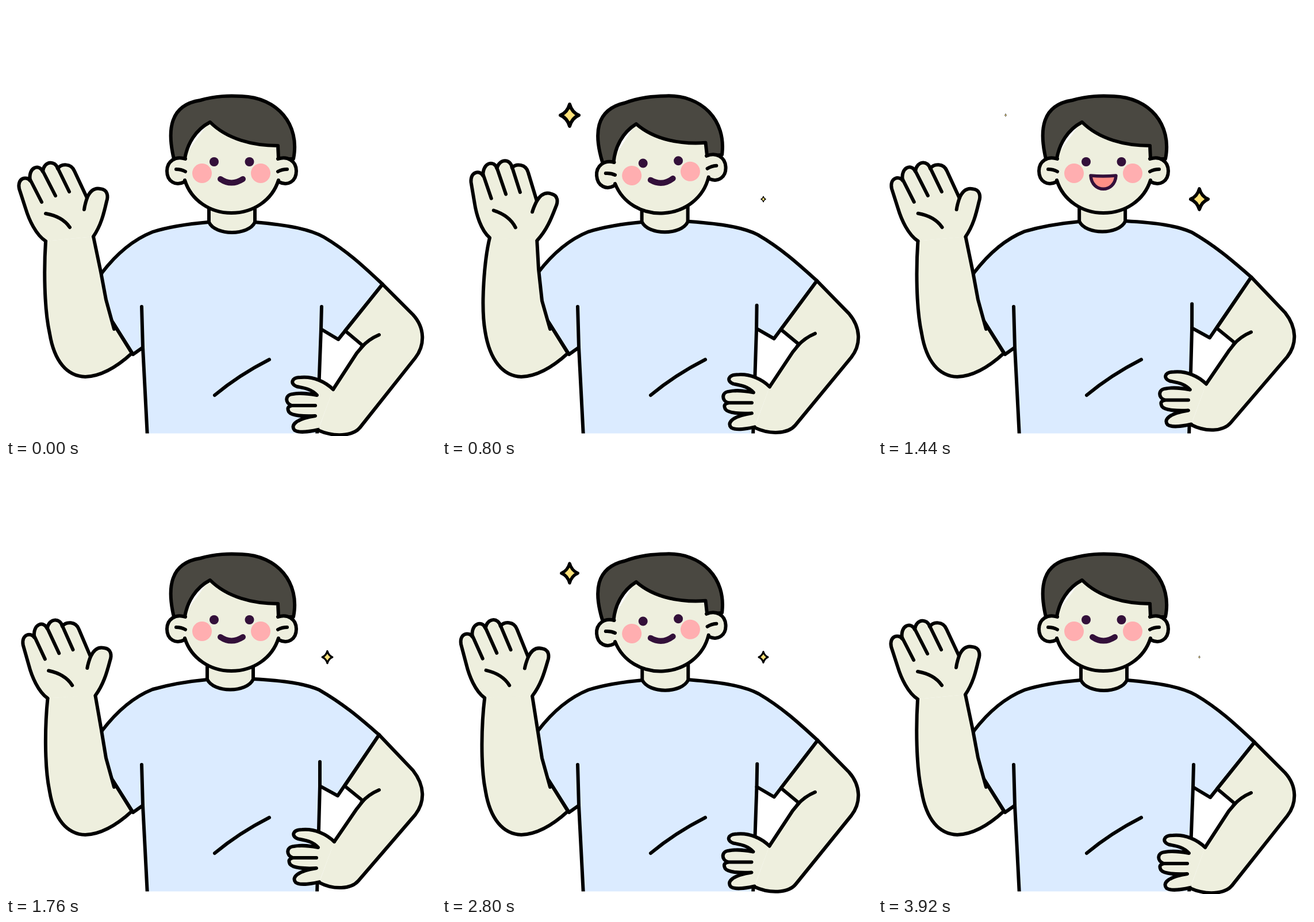
Recreate the animation shown at these times as an HTML page. Size 748 by 748 pixels, loop 4000 ms.

```html
<!DOCTYPE html>
<html>
<head>
<meta charset="utf-8">
<style>
  html, body { margin: 0; width: 100%; height: 100%; overflow: hidden; background: #fff; }
  svg { display: block; width: 100%; height: 100%; }
  .ink { stroke: #000; stroke-width: 6; stroke-linecap: round; stroke-linejoin: round; }
  .skin { fill: #eeefde; }
  .line { fill: none; }
  .hair { fill: #4a4841; }
  .shirt { fill: #dbebff; }
  .blush { fill: #ffaeb0; }
  .plum { fill: #33103a; }
  .spark { fill: #ffe27a; }
</style>
</head>
<body>
<svg viewBox="0 0 748 748">
  <defs>
    <path id="star" d="M0-19Q4-5 16 0Q4 5 0 19Q-4 5-16 0Q-4-5 0-19Z"/>
  </defs>
  <g class="ink">
    <path id="shirt" class="shirt"/>
    <path id="seams" class="line"/>
    <path class="line" d="M363 677Q405 642 458 615"/>
    <rect x="200" y="743.5" width="350" height="10" fill="#fff" stroke="none"/>

    <path id="restArm" class="skin"/>
    <path id="crease" class="line"/>
    <g id="restHand">
      <path class="skin" d="M543 737C525 741 510 743 502 738C494 729 505 718 538 713C520 714 497 713 492 706C489 700 490 697 497 695C485 691 485 676 499 675C515 672 530 675 541 677C530 665 515 664 506 662C493 657 497 646 513 646C535 644 556 654 569 667"/>
      <path class="line" d="M496 695L538 695"/>
    </g>

    <path id="waveArm" class="skin"/>
    <g id="waveHand">
      <path class="skin" d="M69 409C52 398 40 372 34 352L23 318C19 299 36 295 42 304C38 280 58 274 64 288C66 269 86 268 90 283C96 274 113 273 119 287L141 334C146 322 154 316 164 318C177 319 178 331 175 340C170 362 165 382 152 401"/>
      <path class="line" d="M41 300L62 341M64 287L86 330M90 282L110 323M136 354C137 346 139 340 141 334M69 361Q98 366 111 385"/>
    </g>

    <path id="neck" class="skin" d="M353 340V376C364 400 422 400 433 376V340"/>
    <g id="head">
      <path class="skin" stroke="none" d="M311 303C322 338 355 360 392 360C430 360 463 338 474 303V240L355 200L311 260Z"/>
      <path class="hair" d="M292 266C280 215 285 172 338 164C365 156 388 156 410 157C472 159 512 206 500 266L474 266L473 243C430 243 385 232 355 202C330 215 315 240 311 266Z"/>
      <path class="skin" d="M312 266C295 260 280 270 280 287C280 305 295 314 310 306"/>
      <path class="skin" d="M473 266C490 260 505 270 505 287C505 305 490 314 475 306"/>
      <path class="line" d="M311 303C322 338 355 360 392 360C430 360 463 338 474 303M296 284Q305 284 312 288M489 284Q480 284 473 288"/>
      <g stroke="none">
        <circle class="blush" cx="341" cy="291" r="17"/>
        <circle class="blush" cx="443" cy="291" r="17"/>
        <ellipse class="plum eye" cx="362" cy="271" rx="8"/>
        <ellipse class="plum eye" cx="423.5" cy="271" rx="8"/>
      </g>
      <path id="smile" class="line" style="stroke:#33103a;stroke-width:10" d="M373 301Q392 314 412 301"/>
      <path id="laugh" fill="#ff8f86" style="stroke:#33103a;stroke-width:5.5" d="M370 295Q391 297 414 295C412 326 372 326 370 295Z"/>
    </g>

    <use id="sparkLeft" href="#star" class="spark"/>
    <use id="sparkRight" href="#star" class="spark"/>
  </g>
</svg>
<script>
const LOOP = 4000, STEP = 80;
const el = id => document.getElementById(id);
const place = (id, transform) => el(id).setAttribute('transform', transform);
const smooth = k => (1 - Math.cos(Math.PI * k)) / 2;
const linear = k => k;

// keys: [time, value] pairs in order of time
function track(keys, t, ease = smooth) {
  const i = keys.findIndex(key => key[0] > t);
  if (i < 0) return keys[keys.length - 1][1];
  if (i === 0) return keys[0][1];
  const [t0, v0] = keys[i - 1], [t1, v1] = keys[i];
  return v0 + (v1 - v0) * ease((t - t0) / (t1 - t0));
}

// blends the numbers of two paths with the same commands
function morph(id, from, to, k) {
  const ends = to.match(/\d+/g);
  let i = 0;
  el(id).setAttribute('d', from.replace(/\d+/g, n => +n + (ends[i++] - n) * k));
}

const wave = [[0, 0], [800, 1], [1520, 0], [2240, 1], [3200, 0]];
const breath = [[0, 0], [1680, 1], [3360, 0]];
const tilt = [[80, 0], [640, 1], [800, 1], [1320, 0], [2040, 0], [2560, 1], [2880, 1], [3600, 0]];
const blink = [[1060, 1], [1180, 0], [1300, 1], [2128, 1], [2248, 0], [2368, 1]];
const leftSpark = [[160, 0], [800, 1], [1520, 0], [2230, 0], [2870, 1], [3590, 0]];
const rightSpark = [[600, 0], [1400, 1], [2200, 0], [2400, 0], [3200, 1], [4000, 0]];

function draw(t) {
  const w = track(wave, t), b = track(breath, t), h = track(tilt, t);

  morph('shirt',
    'M393 374L352 376C318 379 283 384 255 393C220 407 190 434 167 464L160 480L178 538L221 606L238 594L246 750L541 750L548 562L578 580L655 484C625 456 595 427 553 402C528 388 490 381 433 376Z',
    'M391 372L350 375C318 378 283 384 255 392C220 406 190 434 167 464L160 480L178 538L221 606L238 594L246 750L541 750L546 560L577 577L649 471C620 446 590 419 545 393C520 382 485 377 430 374Z', b);
  morph('seams', 'M236 523L238 594M549 523L548 562', 'M236 523L238 594M546 518L546 560', b);
  morph('restArm',
    'M543 738C570 750 603 749 616 733L712 612C729 590 729 560 708 537L655 484L590 565L621 591L610 604L569 667',
    'M545 728C570 741 600 740 613 725L712 610C729 588 729 560 708 533L649 471L589 560L621 586L610 600L571 657', b);
  morph('crease', 'M618 594C627 584 637 577 649 572', 'M618 589C627 579 637 572 649 567', b);
  place('restHand', `translate(${2 * b} ${-10 * b})`);

  morph('waveArm',
    'M69 409C66 455 66 525 76 570C84 618 106 644 138 645C168 644 195 626 219 604L186 551L188 562L174 511L165 463L152 401',
    'M83 403C74 440 67 520 75 566C83 616 106 644 138 645C168 644 195 626 219 604L186 551L188 562L174 513L168 458L165 404', w);
  place('waveHand', `translate(${14 * w} 0) rotate(${8.3 * w} 110 405)`);

  place('neck', `translate(${-3 * b - 4 * h} ${-1.5 * b})`);
  place('head', `rotate(${-4 * h} 392 448)`);
  const open = track(blink, t, linear);
  document.querySelectorAll('.eye').forEach(eye => eye.setAttribute('ry', 1 + 7 * open));
  const laughing = t >= 960 && t < 1600;
  el('laugh').style.display = laughing ? '' : 'none';
  el('smile').style.display = laughing ? 'none' : '';

  place('sparkLeft', `translate(222 190) scale(${track(leftSpark, t, linear)})`);
  place('sparkRight', `translate(559 336) scale(${track(rightSpark, t, linear)})`);
}

const start = performance.now();
function tick() {
  const t = (performance.now() - start) % LOOP;
  draw(Math.floor(t / STEP) * STEP);
  requestAnimationFrame(tick);
}
tick();
</script>
</body>
</html>
```
